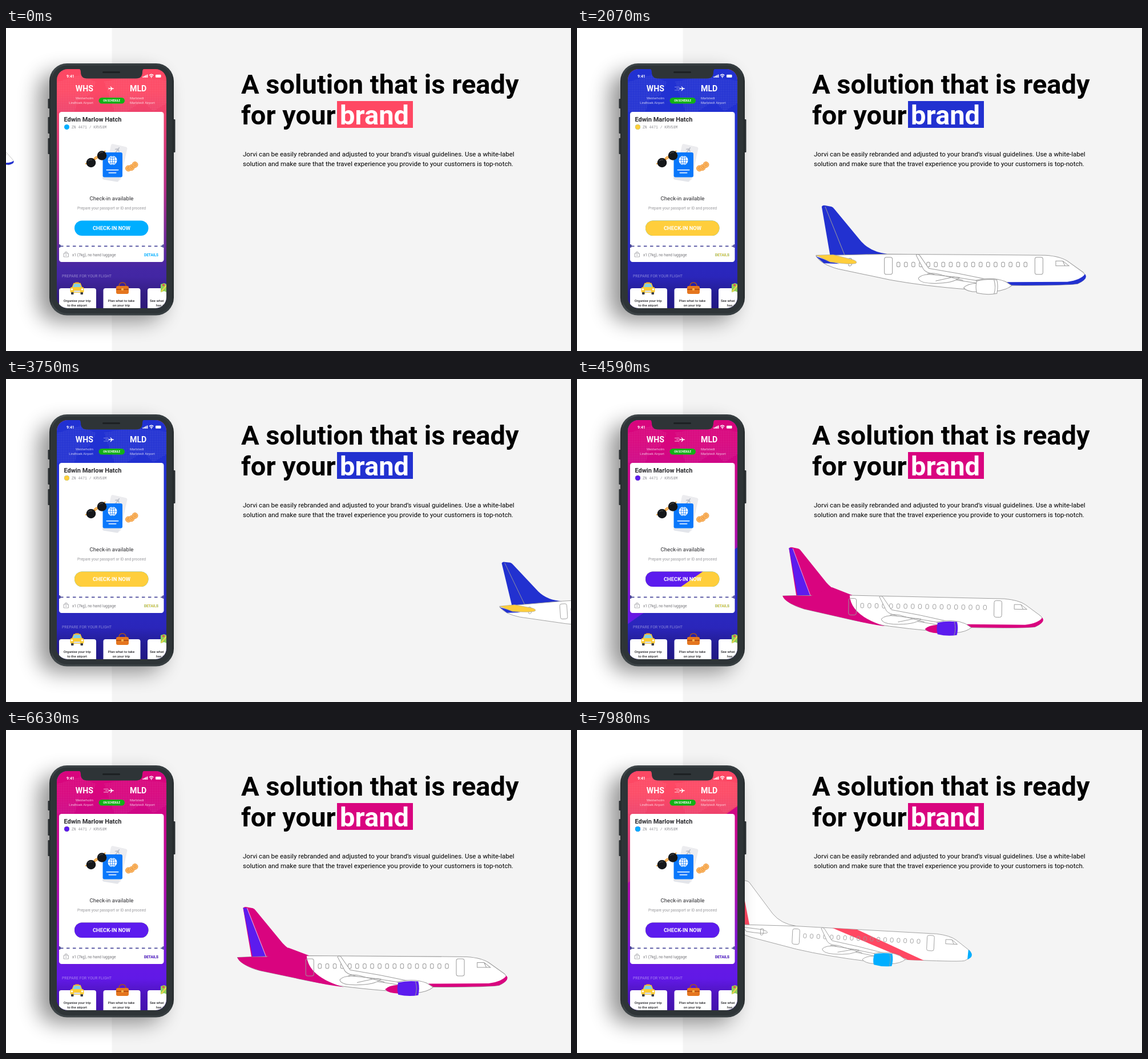
Write an HTML page that moves like this. It is 990 by 566 pixels and loops after 8000 ms.

```html
<!DOCTYPE html>
<html lang="en">
<head>
<meta charset="utf-8">
<title>Brand themes</title>
<style>
  html, body { margin: 0; height: 100%; overflow: hidden; background: #f4f4f4; }
  svg { display: block; width: 100vw; height: 100vh; font-family: Roboto, sans-serif; }
  .b { font-weight: 700; }
  .m { font-weight: 500; }
  .mid { text-anchor: middle; }
  .end { text-anchor: end; }
  .line { fill: #fff; stroke: #9b9b9b; stroke-width: 1; stroke-linejoin: round; }
  .open { fill: none; stroke: #9b9b9b; stroke-width: 1; }
</style>
</head>
<body>
<svg id="stage" viewBox="0 0 990 566"></svg>
<script>
const LOOP = 8000, WIPE = 755, BRAND_DELAY = 375;

const themes = {
  red:  { brand: '#ff4863', accent: '#00aeff', stops: ['#fd4864', '#b62f88', '#4427a4', '#3c22a0'], trails: false },
  blue: { brand: '#2231d0', accent: '#ffce3c', stops: ['#2131d2', '#2430cc', '#2a27bd', '#2b20b0'], trails: true },
  pink: { brand: '#d9047f', accent: '#5c1bee', stops: ['#d8057d', '#ac0fab', '#6319e6', '#5a18e6'], trails: true }
};

// One act per theme: its plane flies in, the screen is wiped, the plane leaves.
const acts = [
  { theme: 'blue', start: 30,   rest: [675.5, 414.2], leave: 2430, span: 630, dist: 81.5, power: 2.2 },
  { theme: 'pink', start: 4104, rest: [662, 413.5], leave: 6480, span: 750, dist: 102,  power: 4 },
  { theme: 'red',  start: 7714, rest: [667, 412],   leave: 9999, span: 1,   dist: 0,    power: 1 }
];

const rect = (x, y, w, h, r, fill, extra = '') =>
  `<rect x="${x}" y="${y}" width="${w}" height="${h}" rx="${r}" fill="${fill}" ${extra}/>`;
const circle = (x, y, r, fill, extra = '') => `<circle cx="${x}" cy="${y}" r="${r}" fill="${fill}" ${extra}/>`;
const path = (d, fill, extra = '') => `<path d="${d}" fill="${fill}" ${extra}/>`;
const shape = (d, cls = 'line') => `<path d="${d}" class="${cls}"/>`;
const text = (x, y, size, fill, str, cls = '', extra = '') =>
  `<text x="${x}" y="${y}" font-size="${size}" fill="${fill}" class="${cls}" ${extra}>${str}</text>`;

const jetIcon = 'M-5 -.8 L-1 -.8 L-3 -4.5 L-1.6 -4.5 L1.6 -.8 L4 -.8 Q5.6 0 4 .8 L1.6 .8 L-1.6 4.5 L-3 4.5 L-1 .8 L-5 .8 L-6 2 L-6.6 2 L-6 0 L-6.6 -2 L-6 -2Z';

// ---- plane ----
function plane(name) {
  const { brand, accent } = themes[name];
  const fin = 'M421 311 Q423 308 427 309 L438 311 Q441 312 443 315 L490 372 Q507 391 537 394 L436 398Z';
  const body = 'M411 397 L436 396 L537 394 L812 396 Q838 398 850 406 L878 426 Q888 437 868 446 Q850 449 750 449 L680 456 Q600 450 540 439 L450 420 Q420 412 411 397Z';
  const belly = 'M745 443 L850 442.500 Q874 439 881 429 Q888 437 868 446 Q850 449 745 448.500Z';
  const windows = Array.from({ length: 18 }, (_, i) =>
    `<rect x="${552.2 + i * 13.06}" y="408" width="5.600" height="8.400" rx="2.700" class="open"/>`).join('');
  const door = x => `<rect x="${x}" y="399.500" width="14" height="30" rx="3.500" class="open"/>`;

  const livery = {
    blue: path(fin, brand) + shape('M427 311 L462 398', 'open') + shape(body)
      + path(belly, brand)
      + path('M411 398 L440 408 L452 411 L425 410Z', brand)
      + shape('M468 402 Q475 399 474 409 Q473 417 468 414Z')
      + path('M411 396 L441 395 L476 404 Q484 407 481 410 Q474 413 436 408Z', accent, 'stroke="#9b9b9b" stroke-width=".6"'),
    pink: path(fin, brand) + path('M421 310 L428 311 L462 398 L438 398Z', accent)
      + path('M428 311 L462 398', 'none', 'stroke="#e9a9d8" stroke-width="1"') + shape(body)
      + path(belly, brand)
      + path('M411 397 L436 396 L462 396 L500 380 L537 394 L532 394 Q535 431 597 449 Q565 445 540 439 L450 420 Q414 409 411 397Z', brand),
    red: shape(fin) + path('M421 311 L425 311 L446 397 L436 398Z', brand) + shape(body)
      + path('M608 394.500 L656 395 L789 449 L759 449.500Z', brand)
      + path('M875 424 L878 426 Q888 437 874 443Z', accent)
      + shape('M434 401 L470 404 Q484 407 481 410 Q474 413 440 409Z')
      + shape('M468 403 Q475 399 474 409 Q473 417 468 414Z', 'open')
  }[name];

  const engineFill = name === 'blue' ? '#fff' : accent;
  const coneFill = name === 'pink' ? brand : '#fff';
  return livery + windows + door(530.5) + door(793.5)
    + shape('M830 406 L842 406 L853 414.500 L830 414.500Z M842 406 L846 414.500', 'open')
    + shape('M586 396 Q588 393 592 396 L608 419 L660 428 L704 437 L742 443 L700 446 L640 437 L606 426 Q599 423 597 417Z')
    + shape('M590 436 Q597 428 616 430 L662 435 Q650 446 612 445 Q591 444 590 436Z')
    + shape('M605 429 Q615 425 632 431 L668 440 M620 441 L652 434 L690 440', 'open')
    + shape('M690 440 Q720 433 742 442 L753 449 Q744 457 724 459Z')
    + path('M669 453 Q675 446 692 445 L692 460 Q675 460 669 453Z', coneFill, name === 'pink' ? '' : 'stroke="#9b9b9b"')
    + path('M692 441 Q708 437 727 439 Q730 451 727 463 Q710 466 692 462 Q689 452 692 441Z', engineFill, name === 'blue' ? 'stroke="#9b9b9b"' : '')
    + shape('M722 439 Q726 451 722 463.500', 'open');
}

// ---- phone screen ----
function illustration() {
  const coin = (x, y) => circle(x, y, 5, '#fbb765', 'stroke="#f09a3e"') + circle(x, y, 2, 'none', 'stroke="#e58b30" stroke-width=".8"');
  return rect(178, 205, 29, 60, 3, '#ececef', 'transform="rotate(12 192 235)"')
    + path(jetIcon, '#b9bcc6', 'transform="translate(196 213) rotate(-55)"')
    + rect(172, 222, 29, 46, 3, '#e3e5ea', 'transform="rotate(9 187 245)"')
    + rect(169.5, 218, 34.5, 43.5, 3, '#0a78fb')
    + circle(186.5, 232, 8, '#fff')
    + path('M178.500 232 H194.500 M186.500 224 V240 M181 227 Q186.500 230 192 227 M181 237 Q186.500 234 192 237', 'none', 'stroke="#0a78fb" stroke-width=".7"')
    + '<ellipse cx="186.500" cy="232" rx="4" ry="8" fill="none" stroke="#0a78fb" stroke-width=".7"/>'
    + rect(175.5, 248, 22, 1.6, .8, '#fff') + rect(179.5, 253, 14, 1.6, .8, '#fff')
    + path('M139 238 L149 235 L168 222 L174 215 M154 230 Q157 224 162 226', 'none', 'stroke="#f2a33c" stroke-width="2"')
    + circle(149, 236, 8.3, '#15171a') + circle(168, 223.500, 8.3, '#15171a')
    + path('M144 233 Q147 230 151 231 M163 220 Q166 217 170 218', 'none', 'stroke="#555" stroke-width="1"')
    + coin(214.500, 246) + coin(220, 244.500) + coin(226, 239.500);
}

const taxi = path('M116 455 L119 447.500 H130 L133 455Z', '#7fd0ea', 'stroke="#f8c52c" stroke-width="1.500"')
  + rect(121, 445.5, 7, 2, 1, '#f3a928') + rect(112.5, 454, 24, 10, 3, '#fccb35')
  + rect(114, 463, 4.5, 4, 1, '#3b3d45') + rect(130.5, 463, 4.5, 4, 1, '#3b3d45')
  + rect(119, 460, 11, 3, 1, '#d9dde0') + circle(115.500, 458, 1.7, '#fff') + circle(133.500, 458, 1.7, '#fff');
const bag = path('M198 453 Q198 446 204 446 Q210 446 210 453', 'none', 'stroke="#a9501b" stroke-width="1.500"')
  + rect(193, 452, 22, 14, 3, '#e5761f') + rect(193, 457, 22, 2, 0, '#b85414') + rect(202, 456, 4, 4, 1, '#f6b04a');
const map = path('M271 449 L277 447 L284 450 V464 L277 461 L271 463Z', '#8ed15a')
  + path('M272 462 L282 450', 'none', 'stroke="#f7d24a" stroke-width="2"') + circle(276, 450.500, 2, '#e94f4f');

const content = `
  ${rect(88, 436, 194, 56, 0, 'url(#shade)')}
  <g fill="url(#dots)"><path d="M89 95 L130 82 L158 95 L146 118 L128 124 L120 146 L89 146Z"/>
    <path d="M172 94 L215 86 L281 92 V132 L258 146 L240 128 L212 146 L190 146 L180 118Z"/></g>
  ${text(106, 86.8, 6.9, '#fff', '9:41', 'b')}
  ${[0, 1, 2, 3].map(i => rect(239.5 + i * 2.4, 85 - i * 1.2, 1.7, 2 + i * 1.2, .4, '#fff')).join('')}
  ${path('M251 83 Q254.700 79.500 258.400 83 M252.600 85 Q254.700 83 256.800 85', 'none', 'stroke="#fff" stroke-width="1.300"')}
  ${circle(254.700, 86.5, .9, '#fff')}${rect(262, 81.8, 9.6, 5, 1.2, '#fff')}
  ${text(153, 111, 14.2, '#fff', 'WHS', 'b end')}${text(217, 111, 14.2, '#fff', 'MLD', 'b')}
  ${path(jetIcon, '#fff', 'transform="translate(185 106.300) scale(.85)"')}
  <g fill-opacity=".75">${text(153, 125, 5.8, '#fff', 'Westerholm', 'end')}${text(153, 133.4, 5.8, '#fff', 'Lindhoek Airport', 'end')}
  ${text(217, 125, 5.8, '#fff', 'Marlstedt')}${text(217, 133.4, 5.8, '#fff', 'Marlstedt Airport')}</g>
  ${rect(162.5, 122, 45.5, 10.5, 5.2, '#12b116')}${text(185.2, 129, 4.5, '#fff', 'ON SCHEDULE', 'b mid')}
  ${rect(93, 147, 183.500, 263, 4.500, '#fff')}
  ${text(101.5, 163.8, 11, '#2a2a2e', 'Edwin Marlow Hatch', 'b')}
  ${text(115, 176.2, 6.4, '#8d8d92', 'ZN 4471 / KRV58M', '', 'font-family="Liberation Mono, monospace"')}
  ${illustration()}
  ${text(185, 302.3, 9.6, '#2c2c30', 'Check-in available', 'mid')}
  ${text(185, 318, 6.7, '#98989c', 'Prepare your passport or ID and proceed', 'mid')}
  ${path('M93 379 a3 3 0 0 1 0 6Z M276.500 379 a3 3 0 0 0 0 6Z', '#4a4798')}
  ${path('M95 382.300 H275', 'none', 'stroke="#4b4a9c" stroke-width="1.700" stroke-dasharray="5.500 5.500"')}
  ${path('M101 395 H109.500 V401 H101Z M103.500 395 V392.500 H107 V395 M103.500 398 H107', 'none', 'stroke="#a5a5aa" stroke-width=".9"')}
  ${text(116, 399.5, 6.7, '#77777c', 'x1 (7kg), no hand luggage')}
  ${text(98, 437.3, 6.6, '#fff', 'PREPARE FOR YOUR FLIGHT', '', 'fill-opacity=".45" letter-spacing=".15"')}
  ${[93, 170.5, 248].map(x => rect(x, 456, 65, 50, 4, '#fff')).join('')}
  ${taxi}${bag}${map}
  ${text(124.7, 480, 6, '#26262a', 'Organise your trip', 'm mid')}${text(124.7, 488, 6, '#26262a', 'to the airport', 'm mid')}
  ${text(202, 480, 6, '#26262a', 'Plan what to take', 'm mid')}${text(202, 488, 6, '#26262a', 'on your trip', 'm mid')}
  ${text(252, 480, 6, '#26262a', 'See what', 'm')}${text(263, 488, 6, '#26262a', 'has to', 'm')}`;

const backdrop = name => rect(88, 71, 194, 421, 0, `url(#${name})`);

function accents(name) {
  const { accent, trails } = themes[name];
  return (trails ? path('M171 103.500 H179 M174 106.300 H178 M171 109 H179', 'none', 'stroke="#fff" stroke-opacity=".5" stroke-width=".8"') : '')
    + circle(106.5, 173.5, 4.5, accent)
    + rect(120, 337.5, 129.5, 26.5, 13.2, accent)
    + text(267, 400, 6.4, accent, 'DETAILS', 'b end');
}

// The first theme lies below; each act covers it behind its own wipe edge.
const layers = part => part('red')
  + acts.map((a, i) => `<g clip-path="url(#wipe${i})">${part(a.theme)}</g>`).join('');

const gradients = Object.entries(themes).map(([name, { stops }]) =>
  `<linearGradient id="${name}" gradientUnits="userSpaceOnUse" x1="0" y1="110" x2="0" y2="490">${
    stops.map((c, i) => `<stop offset="${[0, .45, .82, 1][i]}" stop-color="${c}"/>`).join('')}</linearGradient>`).join('');

const stage = document.getElementById('stage');
stage.innerHTML = `<defs>${gradients}
    <linearGradient id="shade" x2="0" y2="1"><stop stop-opacity="0"/><stop offset=".5" stop-opacity=".18"/>
      <stop offset="1" stop-opacity=".25"/></linearGradient>
    <pattern id="dots" width="3" height="3" patternUnits="userSpaceOnUse">${circle(1.5, 1.5, .9, '#fff', 'fill-opacity=".14"')}</pattern>
    <clipPath id="glass">${rect(89, 72, 192, 419, 19, '#000')}</clipPath>
    ${acts.map((_, i) => `<clipPath id="wipe${i}"><polygon/></clipPath>`).join('')}
    <filter id="soft" x="-50%" y="-50%" width="200%" height="200%"><feGaussianBlur stdDeviation="18"/></filter>
    <linearGradient id="case"><stop stop-color="#23282a"/><stop offset=".03" stop-color="#3d4447"/>
      <stop offset=".97" stop-color="#353c3f"/><stop offset="1" stop-color="#23282a"/></linearGradient>
  </defs>
  ${rect(0, 0, 990, 566, 0, '#f4f4f4')}${rect(0, 0, 185.5, 566, 0, '#fff')}
  ${text(412, 115, 47, '#000', 'A solution that is ready', 'b')}
  ${text(412, 168.5, 47, '#000', 'for your', 'b')}
  <rect id="brand" x="580" y="128" width="133" height="47"/>
  ${text(585, 168.5, 47, '#fff', 'brand', 'b')}
  ${text(415, 225, 11.5, '#000', 'Jorvi can be easily rebranded and adjusted to your brand’s visual guidelines. Use a white-label')}
  ${text(415, 242, 11.5, '#000', 'solution and make sure that the travel experience you provide to your customers is top-notch.')}
  ${acts.map((a, i) => `<g id="plane${i}">${plane(a.theme)}</g>`).join('')}
  ${rect(57, 78, 219, 436, 32, '#000', 'opacity=".42" filter="url(#soft)"')}
  ${[[73.5, 124, 17], [73.5, 156, 29], [73.5, 193, 28], [292.5, 160, 58]].map(([x, y, h]) => rect(x, y, 4, h, 1, '#2a2f32')).join('')}
  ${rect(76, 62, 218, 441.5, 31, 'url(#case)')}${rect(80, 65.5, 210, 434.5, 27, '#2e3437')}
  <g clip-path="url(#glass)">${layers(backdrop)}${content}${layers(accents)}
    ${text(185, 354.2, 9.4, '#fff', 'CHECK-IN NOW', 'b mid')}</g>
  ${path('M127 71 Q131 72 131 77 Q131 88.500 142 88.500 H228 Q239 88.500 239 77 Q239 72 243 71Z', '#2e3437')}
  ${rect(169, 76, 31, 3, 1.5, '#1c2022')}`;

const brandBox = document.getElementById('brand');
const planes = acts.map((_, i) => document.getElementById('plane' + i));
const wipes = acts.map((_, i) => document.querySelector(`#wipe${i} polygon`));

function pose(act, t) {
  const approach = -662 * Math.exp((act.start - t) / 194);
  const exit = act.dist * (Math.max(0, t - act.leave) / act.span) ** act.power;
  const x = act.rest[0] + approach + exit;
  const y = act.rest[1] + .279 * approach - .04 * exit;
  const angle = -.0165 * approach - .009 * exit;
  const scale = 1.003 + .00063 * approach - .00029 * exit;
  return `translate(${x} ${y}) rotate(${angle}) scale(${scale}) translate(-667 -412)`;
}

function draw(t) {
  let brand = themes.red.brand;
  acts.forEach((act, i) => {
    const next = acts[i + 1];
    const flying = t > act.start - 60 && (!next || t <= next.start - 60);
    planes[i].style.display = flying ? '' : 'none';
    if (flying) planes[i].setAttribute('transform', pose(act, t));

    const progress = Math.min(1, Math.max(0, (t - act.start) / WIPE));
    const edge = 72 + 554 * progress;
    wipes[i].setAttribute('points', `0,-200 300,-200 300,${edge - 147.7} 0,${edge + 62.3}`);
    if (t >= act.start + BRAND_DELAY) brand = themes[act.theme].brand;
  });
  brandBox.setAttribute('fill', brand);
}

const begin = performance.now();
function tick() {
  draw((performance.now() - begin) % LOOP);
  requestAnimationFrame(tick);
}
tick();
</script>
</body>
</html>
```
